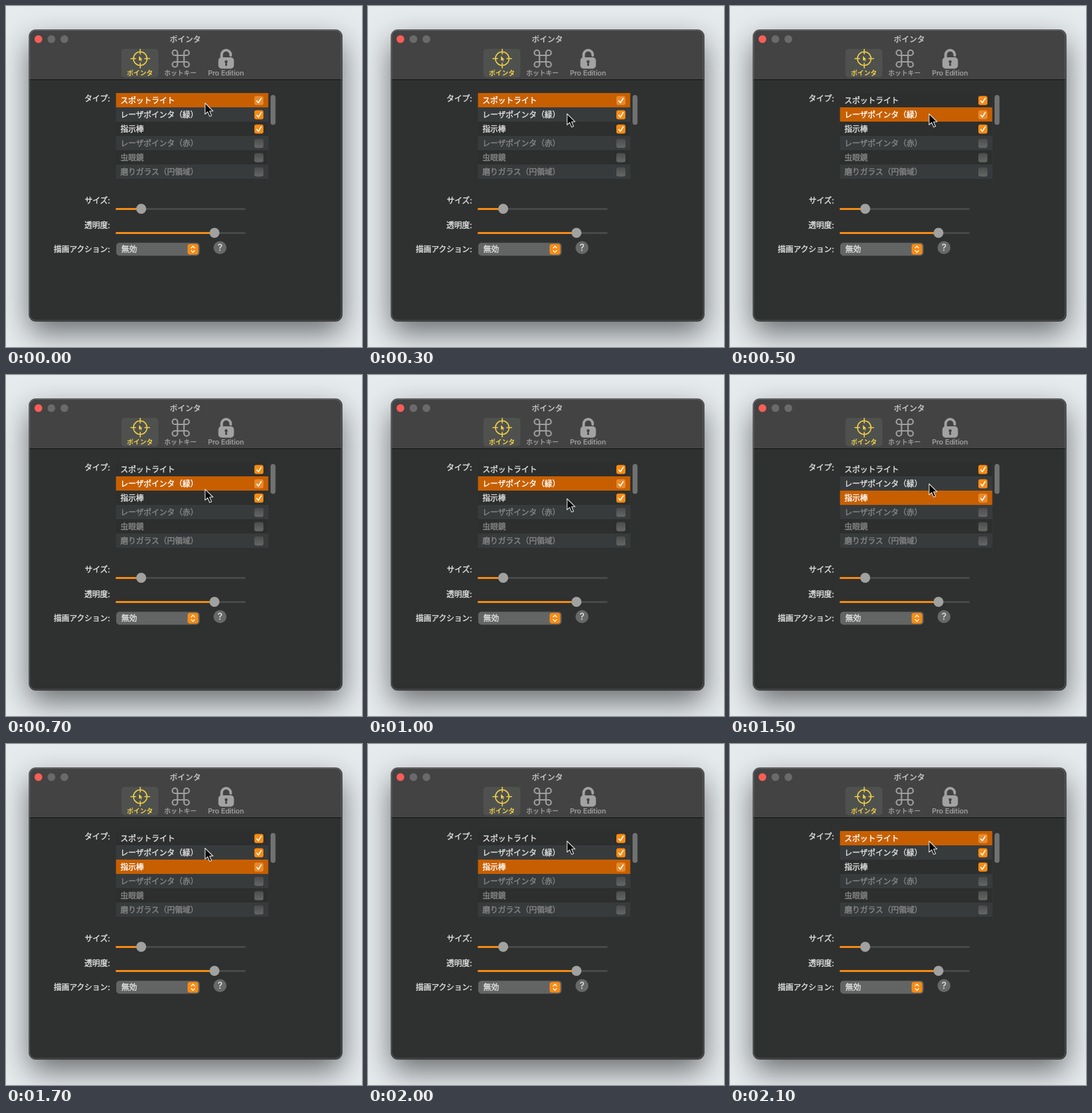
An HTML page that plays this animation: 549 px wide and 525 px high, repeating every 2.4 s.

```html
<!DOCTYPE html>
<html lang="ja">
<head>
<meta charset="utf-8">
<title>ポインタ</title>
<style>
html, body { margin: 0; width: 100%; height: 100%; overflow: hidden; background: #e6ebee; }
.window {
  position: absolute; left: 36px; top: 37px; width: 481.5px; height: 447.5px;
  border-radius: 10px; background: #2f3130;
  box-shadow: 0 0 0 1px rgba(0,0,0,.6), 0 18px 46px rgba(0,0,0,.55);
}
svg { position: absolute; left: 0; top: 0; width: 549px; height: 525px; display: block; }
text {
  font: 400 12px "Noto Sans CJK JP", "Noto Sans CJK", sans-serif;
  color: #e0e1e0; fill: currentColor; stroke: currentColor; stroke-width: .4px;
}
.label { text-anchor: end; }
.title { font-weight: 700; text-anchor: middle; color: #bdbdbd; stroke: none; }
.tab { font-size: 10px; text-anchor: middle; color: #9f9f9f; }
.tab.on { font-weight: 700; color: #f0cf45; stroke: none; }
.tab.latin { font: 500 10.8px Inter, sans-serif; stroke-width: .2px; }
.off { color: #858686; }
.line { fill: none; stroke-linecap: round; stroke-linejoin: round; }
</style>
</head>
<body>
<div class="window"></div>
<svg viewBox="0 0 549 525">
  <linearGradient id="unchecked" x2="0" y2="1">
    <stop stop-color="#4b4c4c"/>
    <stop offset="1" stop-color="#656666"/>
  </linearGradient>
  <path d="M36 113V47a10 10 0 0 1 10-10H507.5a10 10 0 0 1 10 10V113Z" fill="#434343"/>
  <path d="M36 113.5H517.5" stroke="#101010"/>
  <rect x="36.5" y="37.5" width="480.5" height="446.5" rx="9.5" fill="none" stroke="#fff" stroke-opacity=".2"/>
  <circle cx="50" cy="51" r="6" fill="#f95d57"/>
  <circle cx="70" cy="51" r="6" fill="#6a6a6a"/>
  <circle cx="90" cy="51" r="6" fill="#6a6a6a"/>
  <text class="title" x="276.5" y="55.5">ポインタ</text>

  <rect x="178" y="66" width="57" height="44" rx="5" fill="#4f514f"/>
  <g class="line" stroke="#f0cf45" stroke-width="1.6" transform="translate(207 81)">
    <circle r="10.5"/>
    <path d="M0-14.5V-7M0 7V14.5M-14.5 0H-7M7 0H14.5"/>
    <path d="M-2-4V3.6L0 1.9 1.4 4.6 2.3 4.1 1.1 1.5H3.5Z" fill="#f0cf45" stroke="none"/>
  </g>
  <path class="line" stroke="#9f9f9f" stroke-width="2.2" transform="translate(269.5 81)"
    d="M-5-9V9A4 4 0 1 1-9 5H9A4 4 0 1 1 5 9V-9A4 4 0 1 1 9-5H-9A4 4 0 1 1-5-9Z"/>
  <g transform="translate(339.5 81)">
    <path class="line" stroke="#a2a2a2" stroke-width="4" d="M-7 0V-6A7 7 0 0 1 7-6V-5"/>
    <rect x="-12" y="-2" width="24" height="17.5" rx="5" fill="#a2a2a2"/>
    <circle cy="4.8" r="2.3" fill="#434343"/>
    <path d="M-1 6H1L1.6 11H-1.6Z" fill="#434343"/>
  </g>
  <text class="tab on" x="206.5" y="107">ポインタ</text>
  <text class="tab" x="269" y="107">ホットキー</text>
  <text class="tab latin" x="339.2" y="107">Pro Edition</text>

  <text class="label" x="160.4" y="147">タイプ:</text>
  <path d="M404.5 134V266" stroke="#363838"/>
  <g id="list"></g>
  <rect x="408" y="137" width="7.6" height="46" rx="3.8" fill="#707171"/>

  <text class="label" x="160.4" y="304">サイズ:</text>
  <text class="label" x="160.4" y="341.5">透明度:</text>
  <g id="sliders"></g>

  <text class="label" x="160.4" y="379">描画アクション:</text>
  <rect x="170" y="364.5" width="128.5" height="20" rx="5" fill="#636564"/>
  <text x="178" y="379">無効</text>
  <rect x="280" y="366.2" width="16.5" height="16.5" rx="4" fill="#f78b14"/>
  <path class="line" stroke="#fff" stroke-width="1.4" d="M285.7 372.4L288.3 369.8 290.9 372.4M285.7 376.6L288.3 379.2 290.9 376.6"/>
  <circle cx="330" cy="372" r="10" fill="#676968"/>
  <text x="330" y="377.2" text-anchor="middle" style="font:500 14.5px Inter,sans-serif;stroke:none">?</text>

  <path id="cursor" d="M0 0V17L4 13.4 7 20.4 10 19.2 7 12.2H12.2Z"
    fill="#050505" stroke="#e4e4e4" stroke-width="1.1" stroke-linejoin="round"/>
</svg>
<script>
const LOOP = 2400, STEP = 100;
const ROW_TOP = 134, ROW_H = 22;
const ORANGE = "#f78b14";
const names = ["スポットライト", "レーザポインタ（緑）", "指示棒", "レーザポインタ（赤）", "虫眼鏡", "磨りガラス（円領域）"];
const byId = id => document.getElementById(id);

function add(parent, tag, attrs, text) {
  const el = document.createElementNS("http://www.w3.org/2000/svg", tag);
  for (const key in attrs) el.setAttribute(key, attrs[key]);
  if (text) el.textContent = text;
  parent.appendChild(el);
  return el;
}

const rows = names.map((name, i) => {
  const y = ROW_TOP + i * ROW_H, enabled = i < 3;
  const idle = i % 2 ? "#383b3c" : "#2d2f2e";
  const list = byId("list");
  const bar = add(list, "rect", { x: 169.6, y, width: 234.8, height: ROW_H, fill: idle });
  const label = add(list, "text", { x: 176.5, y: y + 15.7, class: enabled ? "" : "off" }, name);
  const box = add(list, "rect", { x: 383, y: y + 4.5, width: 14, height: 14, rx: 3, fill: "url(#unchecked)" });
  if (enabled) add(list, "path", {
    class: "line", stroke: "#fff", "stroke-width": 1.6,
    d: `M386.7 ${y + 12}l2.5 3 4.4-7`
  });
  return { bar, label, box, idle, enabled };
});

for (const [y, x] of [[312, 208.5], [349, 321.5]]) {
  const bar = (width, fill) => add(byId("sliders"), "rect", { x: 169, y: y - 1, width, height: 3, rx: 1.5, fill });
  bar(200.5, "#484a49");
  bar(x - 169, ORANGE);
  add(byId("sliders"), "circle", { cx: x, cy: y + .3, r: 7.7, fill: "#a1a19f" });
}

// Selection changes: [time, row]
const picks = [[0, 0], [500, 1], [1100, 2], [2100, 0]];
// Pointer tip: [time, y]
const path = [[0, 149.5], [300, 166], [500, 166], [1000, 190.5], [1100, 190.5], [1500, 167.5], [2000, 149.5], [LOOP, 149.5]];

function tipY(t) {
  const i = path.findIndex(p => p[0] > t);
  const [t0, y0] = path[i - 1], [t1, y1] = path[i];
  return y0 + (y1 - y0) * (t - t0) / (t1 - t0);
}

let selected = -1;
function select(index) {
  if (index === selected) return;
  selected = index;
  rows.forEach((row, i) => {
    const on = i === index;
    row.bar.setAttribute("fill", on ? "#c75f00" : row.idle);
    row.label.style.color = on ? "#fff" : "";
    if (row.enabled) row.box.setAttribute("fill", on ? "#e98a2a" : ORANGE);
  });
}

function draw(time) {
  const t = Math.floor(time % LOOP / STEP) * STEP;
  select(picks.filter(p => p[0] <= t).pop()[1]);
  byId("cursor").setAttribute("transform", `translate(307 ${tipY(t)})`);
}

const start = performance.now();
function tick() {
  draw(performance.now() - start);
  requestAnimationFrame(tick);
}
tick();
</script>
</body>
</html>
```
